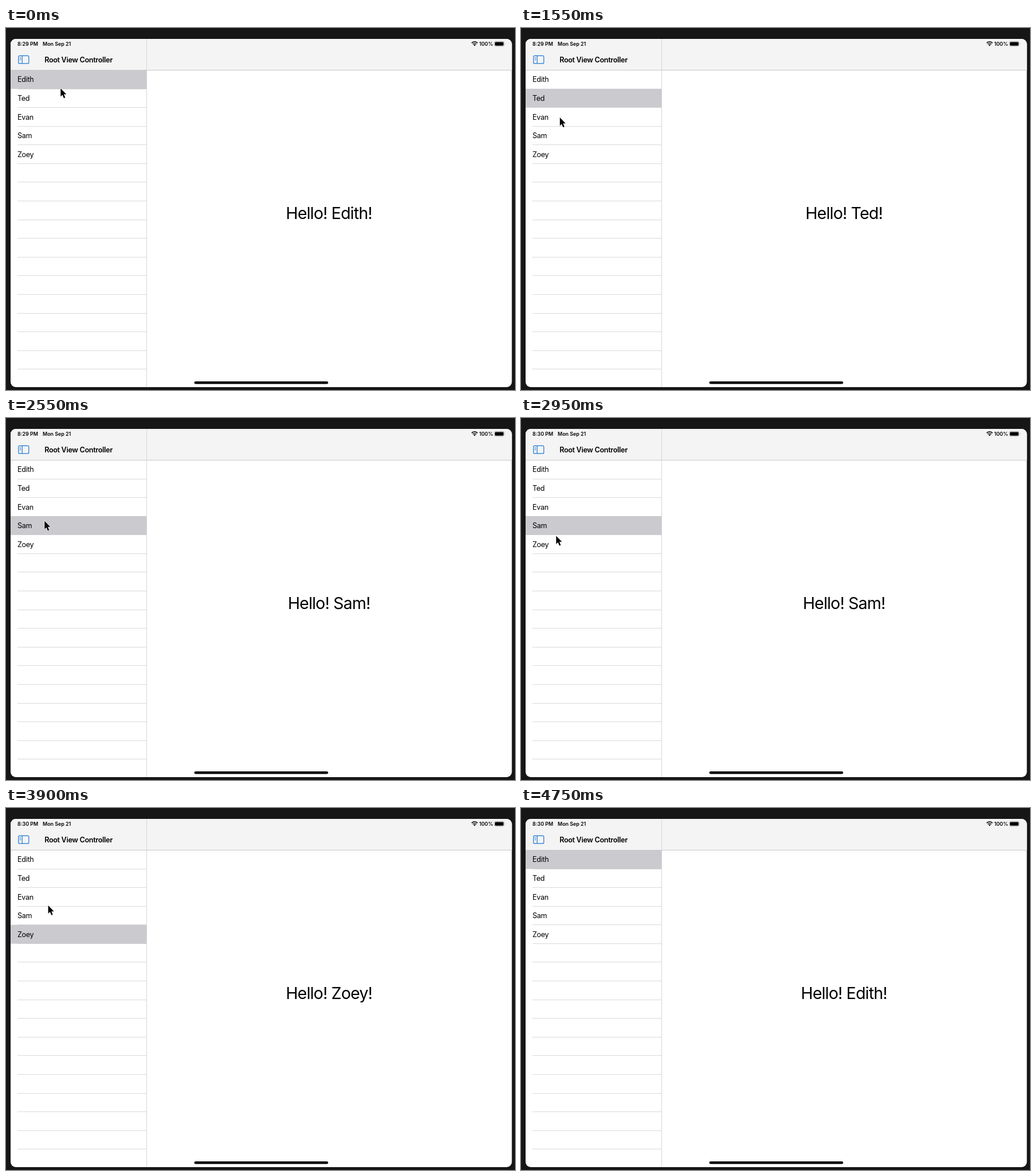
Animation of 888x631 px, one loop 5 s. Source, as an HTML page:

```html
<!DOCTYPE html>
<html lang="en">
<head>
<meta charset="utf-8">
<title>Split view</title>
<style>
  html, body { margin: 0; width: 100%; height: 100%; overflow: hidden; background: #161616; }
  svg { display: block; width: 888px; height: 631px; }
  text { font: 12.6px Inter, "Liberation Sans", sans-serif; letter-spacing: -.025em; }
  .status { font-size: 8.9px; font-weight: 600; letter-spacing: 0; }
  .title { font-weight: 600; text-anchor: middle; }
  .hello { font-size: 28.5px; letter-spacing: -.028em; text-anchor: middle; }
</style>
</head>
<body>
<svg viewBox="0 0 888 631">
  <defs>
    <clipPath id="screen"><rect x="8" y="19" width="874.5" height="607" rx="9"/></clipPath>
  </defs>
  <g clip-path="url(#screen)">
    <rect width="888" height="631" fill="#fff"/>
    <rect width="888" height="73.5" fill="#f4f4f4"/>
    <path d="M8 73.5H883" stroke="#c8c8c9"/>
    <g id="lines" stroke="#dadadc"></g>
    <rect id="mark" x="8" width="237.5" height="32.9" fill="#cbcace"/>
    <path d="M245.5 19V627" stroke="#d6d6d8"/>
    <g id="names"></g>
  </g>

  <text id="clock" class="status" x="20" y="30.8"></text>
  <text class="status" x="64" y="30.8">Mon Sep 21</text>
  <text class="status" x="825.5" y="30.8">100%</text>
  <g fill="none" stroke="#000" stroke-width="1.5">
    <path d="M812.4 26.1a7.3 7.3 0 0 1 10.2 0M814.3 28.2a4.6 4.6 0 0 1 6.4 0"/>
    <path d="M817.5 31.6l-1.9-2.1a2.7 2.7 0 0 1 3.8 0z" fill="#000" stroke="none"/>
  </g>
  <rect x="851.9" y="23.4" width="17.2" height="8.4" rx="2.4" fill="none" stroke="#a0a0a0" stroke-width=".8"/>
  <rect x="853" y="24.5" width="15" height="6.2" rx="1.4"/>
  <path d="M870 26.2q1.2 1.4 0 2.8z" fill="#a0a0a0"/>

  <g fill="none" stroke="#1f78d1" stroke-width="1.2">
    <rect x="21.8" y="48.3" width="18" height="13.6" rx="2"/>
    <path d="M28.2 48.3v13.6"/>
    <path d="M23.8 51.3h2.4m-2.4 2.2h2.4m-2.4 2.2h2.4" stroke-width=".9"/>
  </g>
  <text class="title" x="126.5" y="59.6">Root View Controller</text>
  <text id="hello" class="hello" x="563.5" y="332.6"></text>
  <rect x="328.5" y="616" width="233.5" height="4.5" rx="2.25"/>

  <g id="cursor">
    <path id="arrow" d="M0 0V14.2L3.2 11.2 5.6 17 8 16 5.6 10.3H10Z" transform="translate(.6 1.2)" opacity=".18"/>
    <path d="M0 0V14.2L3.2 11.2 5.6 17 8 16 5.6 10.3H10Z" stroke="#fff" stroke-width="1.6" stroke-linejoin="round" paint-order="stroke"/>
  </g>
</svg>
<script>
const $ = id => document.getElementById(id);
const LOOP = 5000, STEP = 50, TOP = 73.5, ROW = 32.58;
const people = ["Edith", "Ted", "Evan", "Sam", "Zoey"];

// [time, selected row]
const picks = [[0, 0], [600, 1], [1650, 2], [2550, 3], [3350, 4], [4400, 0]];

const sine = u => (1 - Math.cos(Math.PI * u)) / 2;
const out = u => 1 - (1 - u) ** 2;
const rush = u => u ** 2.2;

// [start, end, x, y, easing]: each move sets off from where the last one ended
const moves = [
  [50, 350, 88.5, 114.5, sine],
  [1150, 1550, 67.8, 156, sine],
  [1950, 2150, 67.3, 179.5, sine],
  [2700, 3250, 58.8, 216.5, out],
  [3600, 4350, 101.6, 81.5, sine],
  [4550, 4700, 548, 10, rush]
];

const add = (id, tag, attrs, text = "") => {
  const el = document.createElementNS("http://www.w3.org/2000/svg", tag);
  for (const k in attrs) el.setAttribute(k, attrs[k]);
  el.textContent = text;
  $(id).append(el);
};
for (let i = 1; i < 17; i++) add("lines", "path", { d: `M20 ${Math.round(TOP + ROW * i - .5) + .5}H245.5` });
people.forEach((name, i) => add("names", "text", { x: 20, y: TOP + ROW * i + 20.9 }, name));

function cursorAt(t) {
  let x = 95.3, y = 105.3;
  for (const [start, end, toX, toY, ease] of moves) {
    if (t <= start) break;
    const k = ease(Math.min(1, (t - start) / (end - start)));
    x += (toX - x) * k;
    y += (toY - y) * k;
  }
  return [x, y];
}

function draw(now) {
  const t = Math.floor(now % LOOP / STEP) * STEP;
  const row = picks.filter(p => p[0] <= t).pop()[1];
  $("mark").setAttribute("y", TOP + ROW * row - .2);
  $("hello").textContent = `Hello! ${people[row]}!`;
  $("clock").textContent = t < 2850 ? "8:29 PM" : "8:30 PM";
  $("cursor").setAttribute("transform", `translate(${cursorAt(t)})`);
  $("cursor").setAttribute("visibility", t < 4750 ? "visible" : "hidden");
}

const begin = performance.now();
function tick() {
  draw(performance.now() - begin);
  requestAnimationFrame(tick);
}
tick();
</script>
</body>
</html>
```
